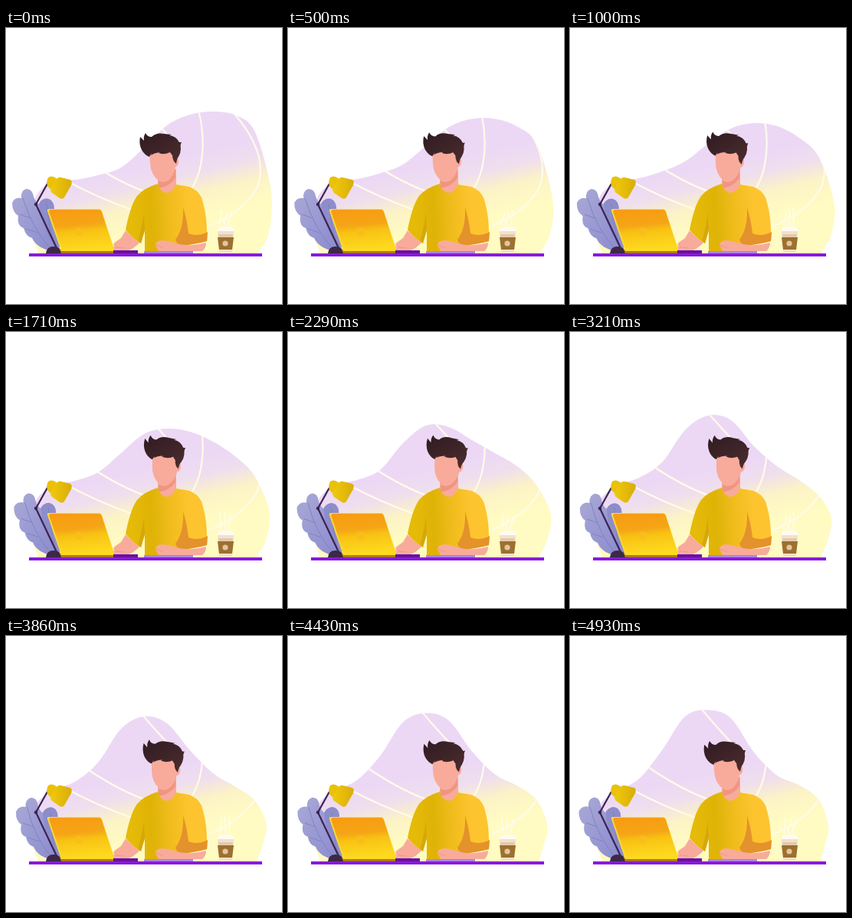
These frames come from a looping animation (360 by 360 pixels, 5000 ms). An HTML page:

```html
<!DOCTYPE html>
<html lang="en">
<head>
<meta charset="utf-8">
<title>Working at a desk</title>
<style>
  html, body { margin: 0; width: 100%; height: 100%; overflow: hidden; background: #fff; }
  svg { display: block; width: 100vw; height: 100vh; }
  .lines, .steam { fill: none; stroke-linecap: round; }
  .lines { stroke: #fffbe9; stroke-width: 2.2; }
  .steam { stroke: #fff; stroke-width: 2; opacity: .5; }
  .skin { fill: #f8ab9b; }
  .vein { fill: none; stroke: #7d7dba; stroke-width: .8; }
  .arm { fill: none; stroke: #3c2353; stroke-width: 2.2; stroke-linejoin: round; }
</style>
</head>
<body>
<svg viewBox="0 0 360 360">
  <defs>
    <linearGradient id="sky" gradientUnits="userSpaceOnUse" x1="228" y1="168" x2="247" y2="248">
      <stop offset="0" stop-color="#ecd8f5"/>
      <stop offset=".3" stop-color="#efdeee"/>
      <stop offset=".62" stop-color="#fcf3c6"/>
      <stop offset="1" stop-color="#fffbc2"/>
    </linearGradient>
    <linearGradient id="lid" x2=".15" y2="1">
      <stop offset="0" stop-color="#f89b12"/>
      <stop offset=".42" stop-color="#f5a516"/>
      <stop offset=".58" stop-color="#f8c213"/>
      <stop offset="1" stop-color="#fdd91f"/>
    </linearGradient>
    <linearGradient id="shirt" gradientUnits="userSpaceOnUse" x1="164" x2="240" y1="250" y2="246">
      <stop offset="0" stop-color="#e6ba08"/>
      <stop offset=".35" stop-color="#dfb306"/>
      <stop offset=".65" stop-color="#efbc1c"/>
      <stop offset="1" stop-color="#fdc42f"/>
    </linearGradient>
    <linearGradient id="leaf" x2="1" y2="1">
      <stop offset="0" stop-color="#a9a9d6"/>
      <stop offset="1" stop-color="#8b8bd0"/>
    </linearGradient>
    <linearGradient id="hair" x2="1" y2="1">
      <stop offset="0" stop-color="#2f1b22"/>
      <stop offset="1" stop-color="#4d2d2e"/>
    </linearGradient>
    <linearGradient id="shade" x2="1" y2="0">
      <stop offset="0" stop-color="#f0c90c"/>
      <stop offset="1" stop-color="#d9ad08"/>
    </linearGradient>
    <clipPath id="clip"><path id="edge"/></clipPath>
  </defs>

  <path id="blob" fill="url(#sky)"/>
  <g class="lines" clip-path="url(#clip)">
    <path d="M95 166Q140 198 180 213"/>
    <path d="M78 199Q125 224 167 238"/>
    <path d="M168 91Q190 118 218 147"/>
    <path d="M250 104C262 145 257 190 240 212"/>
    <path d="M296 110C326 143 339 178 328 207C317 230 290 250 260 260"/>
  </g>

  <g id="plant">
    <path fill="#8d8dcb" d="M64 291C52 276 42 258 41 240Q41 229 46 225Q52 220 58 224Q63 228 63 236Q68 241 66 249Q70 256 68 263Q72 274 69 291Z"/>
    <path fill="url(#leaf)" d="M60 291C48 289 38 283 34 274Q26 272 23 261Q14 258 16 245Q8 240 8 228Q12 220 20 222Q19 212 26 210Q34 209 36 220Q38 226 43 230C46 252 54 272 66 291Z"/>
    <path class="vein" d="M22 222Q34 262 60 290M18 243L32 248M26 262L41 267M53 229Q56 262 66 290"/>
  </g>

  <path class="arm" d="M54 203L39 230L67 289"/>
  <circle cx="39" cy="230" r="2.2" fill="#3c2353"/>
  <path fill="#3b2947" d="M52 294Q53 285 62 285Q71 285 73 294Z"/>
  <path fill="#e9c106" d="M55 195Q59 192 64 195L68 198L59 211L54 206Q52 201 55 195Z"/>
  <path fill="url(#shade)" d="M66 197Q68 194 72 195L84 198Q87 200 85 205L76 221Q74 224 70 222L60 215Q57 212 59 209Z"/>

  <path class="skin" d="M198 184H222V206Q222 216 209 217Q198 215 198 206Z"/>
  <path fill="#ef9582" d="M199 199Q207 203 213 198L221 184L221 196Q213 207 199 209Z"/>
  <path fill="url(#shirt)" d="M198 203Q200 213 209 215Q219 214 221 204L239 207Q250 211 255 221C260 236 262 252 262 265Q263 273 262 278L230 284V291H181V264L176 281Q164 274 156 263C160 244 164 229 171 219Q179 209 198 203Z"/>
  <path fill="#e4922b" d="M231 234Q236 250 238 268Q250 273 263 266L262 278Q248 282 228 284Q222 281 221 276Q232 262 231 234Z"/>
  <path fill="#c99814" opacity=".5" d="M180 241L181 264L176 281L172 278Q177 262 180 241Z"/>
  <path class="skin" d="M156 264Q164 273 174 280Q168 287 160 290H139Q137 288 141 285Q139 281 143 279L150 274Z"/>
  <path class="skin" d="M222 281Q240 286 261 280Q261 287 256 291H199L195 283Q196 277 204 277L212 278Z"/>
  <path fill="none" stroke="#e99a88" d="M196 283L205 287M143 286L154 287"/>

  <g id="head">
    <path class="skin" d="M187 164L216 158L221 170Q225 168 225 174Q225 180 221 181Q219 193 211 199Q205 203 199 199Q189 191 188 177Z"/>
    <path fill="url(#hair)" d="M187 168Q181 166 177 159Q173 151 175 142L180 147Q179 141 182 137Q184 142 190 142Q196 136 206 138L216 139L213 140Q222 141 226 149L229 149Q227 152 228 157Q228 163 225 168Q223 170 222 177L219 174Q217 170 217 166Q215 164 214 162Q206 166 199 163L201 162Q193 163 189 166L190 163Z"/>
  </g>

  <path fill="#ac7a1c" d="M70 289H142V294H72Z"/>
  <path fill="#fcd83c" d="M56 236H121Q124 236 125 239L142 291H72L54 239Q53 236 56 236Z"/>
  <path fill="url(#lid)" d="M58 237H121Q124 237 125 240L141 291H74L56 239Z"/>
  <circle cx="95" cy="266" r="5.4" fill="#fabe1c"/>

  <path fill="#6a10a6" d="M140 290H172V294H140Z"/>
  <path fill="#b181e2" d="M180 291H244V294H180Z"/>

  <g class="steam">
    <path/><path/><path/>
  </g>
  <path fill="#f1e2cb" d="M276 265H297L295 293H278Z"/>
  <path fill="#fffaf0" d="M277 260Q287 257 296 260L298 265H275Z"/>
  <path fill="#e6c9ab" d="M277 269H296L295.500 273H277Z"/>
  <path fill="#9c702f" d="M276 273H297L295 289H278Z"/>
  <circle cx="286" cy="281" r="3.6" fill="#e4c4a0"/>
  <rect x="30" y="294" width="304" height="4" fill="#8b18dd"/>
</svg>

<script>
  const LOOP = 5000;
  const $ = s => document.querySelector(s);
  const blob = $('#blob'), edge = $('#edge'), plant = $('#plant'), head = $('#head');
  const wisps = document.querySelectorAll('.steam path');

  // Height of the backdrop's upper outline at these x positions, over time
  const xs = [60, 90, 120, 150, 180, 210, 240, 270, 300, 325];
  const poses = [
    { at: 0,    ys: [200, 198, 192, 182, 156, 127, 113, 109, 114, 136] },
    { at: 1000, ys: [201, 196, 187, 174, 151, 131, 124, 128, 144, 169] },
    { at: 1710, ys: [201, 194, 183, 158, 133, 126, 130, 143, 163, 189] },
    { at: 2290, ys: [200, 193, 180, 145, 122, 124, 141, 158, 176, 201] },
    { at: 3210, ys: [201, 190, 170, 128, 109, 115, 149, 175, 194, 214] },
    { at: 3860, ys: [202, 190, 165, 121, 105, 114, 149, 179, 197, 215] },
    { at: 5000, ys: [203, 186, 148, 104,  96, 107, 152, 182, 195, 214] }
  ];
  const mix = (a, b, k) => a + (b - a) * k;

  // Smooth open curve through the points, closed by a straight base
  function smooth(pts) {
    let d = `M${pts[0]}`;
    for (let i = 0; i < pts.length - 1; i++) {
      const a = pts[i], b = pts[i + 1];
      const before = pts[i - 1] || a, after = pts[i + 2] || b;
      const c1 = a.map((v, j) => v + (b[j] - before[j]) / 6);
      const c2 = b.map((v, j) => v - (after[j] - a[j]) / 6);
      d += `C${c1} ${c2} ${b}`;
    }
    return d + 'Z';
  }

  function outline(t) {
    const i = poses.findIndex(p => p.at > t);
    const a = poses[i - 1], b = poses[i];
    const k = (t - a.at) / (b.at - a.at), u = t / LOOP;
    const right = mix(346, 337, u * (0.7 + 0.3 * u));
    return smooth([
      [42, 294], [33, 262], [38, 222],
      ...xs.map((x, j) => [x, mix(a.ys[j], b.ys[j], k)]),
      [right, mix(213, 249, Math.sqrt(u))], [right - 4, 270], [327, 294]
    ]);
  }

  function wisp(x, phase) {
    const s = 3 * Math.sin(phase);
    return `M${x} 257C${x - 4 - s} 250 ${x + 4 + s} 246 ${x + s / 2} ${238 + s}`;
  }

  const start = performance.now();
  function draw() {
    const t = (performance.now() - start) % LOOP;
    const d = outline(t);
    blob.setAttribute('d', d);
    edge.setAttribute('d', d);

    const nod = 6.3 * Math.sin(Math.PI * t / LOOP);
    head.setAttribute('transform', `rotate(${nod} 208 205)`);

    const sway = (1 - Math.cos(Math.PI * t / 3600)) / 2;
    plant.setAttribute('transform',
      `translate(${sway} ${sway}) translate(0 292) skewX(${-3.7 * sway}) translate(0 -292)`);

    wisps.forEach((w, i) => w.setAttribute('d', wisp(280 + 6 * i, 4 * Math.PI * t / LOOP + i)));
    requestAnimationFrame(draw);
  }
  draw();
</script>
</body>
</html>
```
